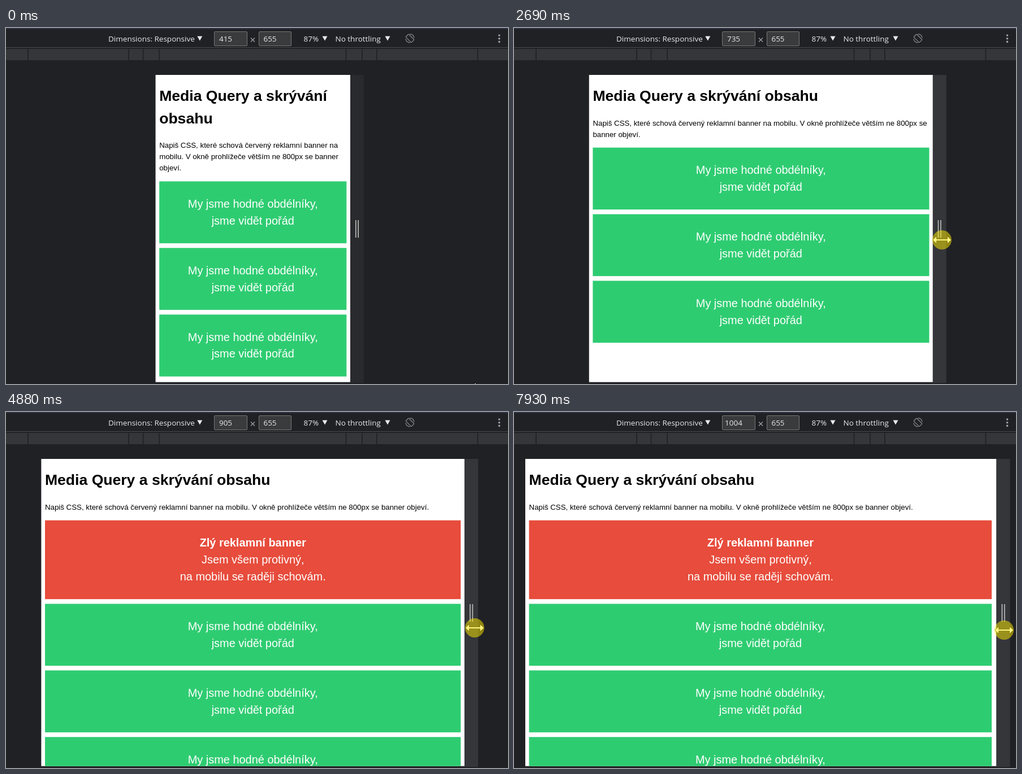
An HTML page that plays this animation: 888x630 px, repeating every 7990 ms.

```html
<!DOCTYPE html>
<html lang="cs">
<head>
<meta charset="utf-8">
<title>Media Query</title>
<style>
html, body { margin: 0; width: 100%; height: 100%; overflow: hidden; background: #202124; }
#page { position: absolute; left: 0; top: 0; height: 655px; overflow: hidden; background: #fff; transform-origin: 0 0; }
#content { padding: 0 8px; box-sizing: border-box; font: 16px/1.5 "Liberation Sans", Arial, sans-serif; color: #000; display: flow-root; }
h1 { font-size: 32px; margin: 21.44px 0; }
p { margin: 16px 0; }
.box { background: #2ecc71; color: #fff; font-size: 24px; text-align: center; padding: 30px 0; margin-bottom: 10px; }
.bad { background: #e74c3c; }
svg { position: absolute; left: 0; top: 0; }
svg text { font: 13.5px "Open Sans", "Noto Sans", sans-serif; fill: #e8eaed; }
.mid { text-anchor: middle; }
</style>
</head>
<body>
<div id="page"><div id="content">
  <h1>Media Query a skrývání obsahu</h1>
  <p>Napiš CSS, které schová červený reklamní banner na mobilu. V okně prohlížeče větším ne 800px se banner objeví.</p>
  <div class="box bad" id="bad"><b>Zlý reklamní banner</b><br>Jsem všem protivný,<br>na mobilu se raději schovám.</div>
  <div class="box">My jsme hodné obdélníky,<br>jsme vidět pořád</div>
  <div class="box">My jsme hodné obdélníky,<br>jsme vidět pořád</div>
  <div class="box">My jsme hodné obdélníky,<br>jsme vidět pořád</div>
</div></div>

<svg width="888" height="630" viewBox="0 0 888 630">
  <path fill="#2b3143" d="M0 0h888v2H0z"/>
  <path fill="#494b4f" d="M0 34h888v1H0z"/>
  <path fill="#35363a" d="M0 37h888v20H0z"/>
  <path stroke="#202124" stroke-width="1.6" d="M39 37v20M217 37v20M242.5 37v20M271 37v20M601.5 37v20M630 37v20M656 37v20M834.5 37v20"/>
  <text x="181" y="24">Dimensions: Responsive</text>
  <text x="526.5" y="24">87%</text>
  <text x="582.5" y="24">No throttling</text>
  <path fill="#e8eaed" d="M338.3 14.5h9l-4.5 8zM559.5 14.5h9l-4.5 8zM670.5 14.5h9l-4.5 8z"/>
  <g fill="#3a3b3d" stroke="#77787a">
    <rect x="368.5" y="6.5" width="58" height="25" rx="1.5"/>
    <rect x="447.5" y="6.5" width="57" height="25" rx="1.5"/>
  </g>
  <text class="mid" id="num" x="388.5" y="24"></text>
  <text class="mid" x="467" y="24">655</text>
  <path stroke="#9aa0a6" stroke-width="1.3" d="M433 17.5l7 7m0-7l-7 7"/>
  <g transform="translate(714.5 18.3)" fill="none" stroke="#85898d" stroke-width="1.3">
    <rect x="-3.6" y="-7" width="7.2" height="14" rx="1" transform="rotate(-45)"/>
    <path d="M-7.6 1A7.7 7.7 0 0 0 0 7.7M7.6 -1A7.7 7.7 0 0 0 0 -7.7"/>
  </g>
  <g fill="#9aa0a6">
    <circle cx="872.5" cy="13" r="1.8"/><circle cx="872.5" cy="18.7" r="1.8"/><circle cx="872.5" cy="24.4" r="1.8"/>
  </g>

  <g id="handle">
    <path id="strip" d="M0 83h24v545H0z"/>
    <path stroke="#b9bab8" stroke-width="1.7" d="M9.8 340v31M14.2 340v31"/>
  </g>
  <g id="cursor">
    <path id="arrow" fill="#fff" stroke="#000" d="M0 0v16.5l3.9-3.7 2.6 6 2.7-1.2-2.6-5.8h5.3z"/>
    <path id="resize" fill="#fff" stroke="#000" stroke-width=".7" d="M-16.5 0l7-6.5v5h19v-5l7 6.5-7 6.5v-5h-19v5z"/>
    <circle id="press" r="17" fill="#ffeb00" fill-opacity=".5"/>
  </g>
</svg>

<script>
const LOOP = 7990, STEP = 68.86, SCALE = 0.83, CENTER = 436.75;
// step, page width, pointer x, pointer y
const KEYS = [
  [0, 415, 829, 627], [3, 415, 636, 374], [5, 415, 636, 374], [8, 415, 624.5, 363],
  [13, 415, 624.5, 363], [19, 487, 655, 364.5], [20, 488.4, 657, 365], [25, 551, 689, 368],
  [37, 717, 754, 374], [39, 732.5, 757, 375], [49, 780, 777, 378], [61, 821, 794, 381],
  [62, 824.8, 796.5, 381], [71, 902.2, 829, 382], [73, 925, 839, 382.5], [85, 1007, 870, 385],
  [86, 1013, 873, 385], [93, 1031, 880, 386], [95, 1031, 880, 386], [97, 1035.5, 883, 386],
  [107, 1035.5, 883, 386], [115, 1004.3, 867, 386]
];
const $ = id => document.getElementById(id);
const show = (id, on) => $(id).style.display = on ? "" : "none";
const move = (id, x, y) => $(id).setAttribute("transform", `translate(${x} ${y})`);

function at(n) {
  let i = KEYS.findIndex(k => k[0] >= n);
  if (i < 0) i = KEYS.length - 1;
  if (i === 0) return KEYS[0];
  const a = KEYS[i - 1], b = KEYS[i];
  const u = Math.min(1, (n - a[0]) / (b[0] - a[0]));
  return a.map((v, j) => v + (b[j] - v) * u);
}

function draw(t) {
  const n = Math.floor(t / STEP + 0.31);
  const [, width, x, y] = at(n);
  const delta = width - at(Math.max(0, n - 1))[1];
  const left = CENTER - width * SCALE / 2;

  $("page").style.width = width + "px";
  $("page").style.transform = `translate(${left}px, 83px) scale(${SCALE})`;
  // the layout runs slightly ahead of the frame while shrinking
  $("content").style.width = width + Math.min(0, delta) / 2 + "px";
  show("bad", width >= 800);
  // the readout runs slightly ahead while growing
  $("num").textContent = Math.round(width + Math.max(0, delta) * 0.33);

  move("handle", left + width * SCALE, 0);
  $("strip").setAttribute("fill", n < 14 ? "#292a2d" : "#35363a");
  move("cursor", x, y);
  show("arrow", n < 7);
  show("resize", n >= 7);
  show("press", n >= 11);
}

const start = performance.now();
function frame() {
  draw((performance.now() - start) % LOOP);
  requestAnimationFrame(frame);
}
frame();
</script>
</body>
</html>
```
